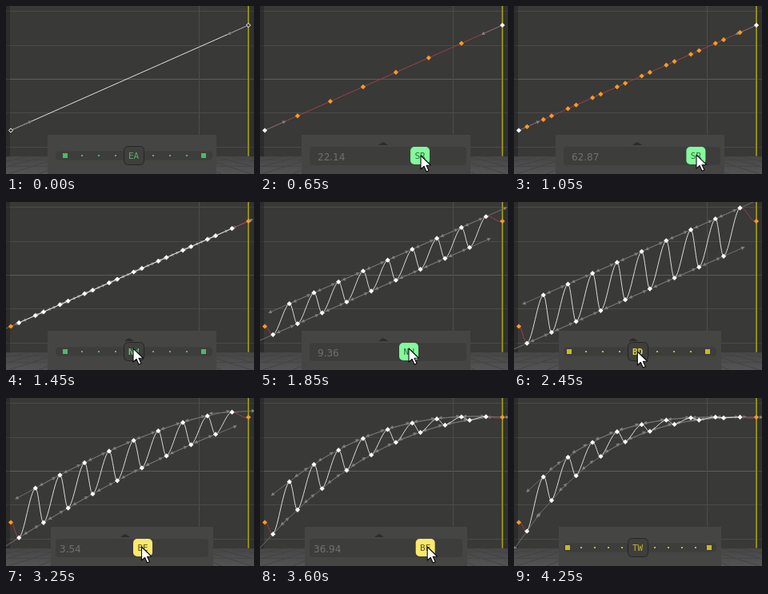
These frames come from a looping animation (310 px wide and 210 px high, 4.35 s). An HTML page with a canvas:

```html
<!DOCTYPE html>
<html lang="en">
<head>
<meta charset="utf-8">
<title>Curve tools</title>
<style>
html, body { margin: 0; width: 310px; height: 210px; overflow: hidden; background: #393937; }
canvas { display: block; width: 310px; height: 210px; }
</style>
</head>
<body>
<canvas id="stage"></canvas>
<script>
const W = 310, H = 210, LOOP = 4350, TICK = 50;
const X0 = 6, X1 = 303, Y0 = 155.5, Y1 = 24, FRAMES = 29;
const SLOPE = (Y1 - Y0) / (X1 - X0), REACH = 26.5, PULL = 0.68;
const canvas = document.getElementById('stage');
const c = canvas.getContext('2d');
const dpr = window.devicePixelRatio || 1;
canvas.width = W * dpr;
canvas.height = H * dpr;

const GREEN = { mid: '#4fb868', text: '#5aa86c', hover: '#6cc781', knob: '#83fa9b', ink: '#2d6b3d' };
const YELLOW = { mid: '#c9b91f', text: '#c4b52c', hover: '#e6d632', knob: '#fae96c', ink: '#5f5719' };

// Piecewise linear track of [time, value] points
function track(points, t) {
  if (t <= points[0][0]) return points[0][1];
  for (let i = 1; i < points.length; i++) {
    const [ta, a] = points[i - 1], [tb, b] = points[i];
    if (t < tb) return a + (b - a) * (t - ta) / (tb - ta);
  }
  return points[points.length - 1][1];
}

const SAMPLE = [[300, 0], [400, 12], [650, 40], [1000, 67.4]];
const WAVE = [[1550, 0], [1650, 9], [1850, 26], [2150, 45]];
const EASE = [[2850, 0], [3050, 5], [3250, 16], [3550, 46], [3850, 80]];
const MOUSE_X = [[50, 190], [200, 160], [300, 160], [400, 173], [650, 201], [1000, 228], [1150, 228],
  [1350, 159], [1550, 159], [1650, 168], [1850, 186], [2150, 204], [2250, 204], [2400, 154.5],
  [2850, 153], [3050, 158], [3250, 169.5], [3550, 202], [3850, 245]];
const MOUSE_Y = [[50, 189], [650, 187], [1150, 186], [1450, 183], [1850, 183], [2250, 184],
  [2450, 187], [3250, 186], [3850, 186]];

const percent = x => x * x / 72.26;

function line(x0, y0, x1, y1, color, width = 1) {
  c.strokeStyle = color;
  c.lineWidth = width;
  c.beginPath();
  c.moveTo(x0, y0);
  c.lineTo(x1, y1);
  c.stroke();
}

function rect(x, y, w, h, color) {
  c.fillStyle = color;
  c.fillRect(x, y, w, h);
}

function rounded(x, y, w, h, r, fill, stroke) {
  c.beginPath();
  c.roundRect(x, y, w, h, r);
  c.fillStyle = fill;
  c.fill();
  if (stroke) {
    c.strokeStyle = stroke;
    c.lineWidth = 1;
    c.stroke();
  }
}

function shape(points, fill) {
  c.fillStyle = fill;
  c.beginPath();
  points.forEach(([x, y]) => c.lineTo(x, y));
  c.closePath();
  c.fill();
}

function diamond(x, y, r, fill, stroke) {
  shape([[x, y - r], [x + r, y], [x, y + r], [x - r, y]], fill);
  if (stroke) {
    c.strokeStyle = stroke;
    c.lineWidth = 1;
    c.stroke();
  }
}

function text(s, x, y, font, color, align) {
  c.font = font;
  c.textAlign = align;
  c.textBaseline = 'alphabetic';
  c.fillStyle = color;
  c.fillText(s, x, y);
}

function drawLabel(s, x, color, weight = 'normal') {
  text(s, x, 191, weight + ' 11px "DejaVu Sans Mono", monospace', color, 'center');
}

function drawGraph() {
  rect(0, 0, W, H, '#393937');
  for (const y of [6.5, 49.5, 133.5, 176.5]) line(0, y, W, y, '#4b4b49');
  line(0, 91.5, W, 91.5, '#5d5d5b');
  line(241.5, 0, 241.5, 188, '#4d4d4b');
  rect(0, 0, 5, 188, 'rgba(30,30,32,.45)');
  rect(304, 0, 6, 188, 'rgba(30,30,32,.3)');
  rect(302, 0, 2, 188, '#918919');
}

function drawFloor() {
  const g = c.createLinearGradient(0, 188, 0, 210);
  g.addColorStop(0, '#474747');
  g.addColorStop(1, '#535353');
  c.fillStyle = g;
  c.fillRect(0, 188, W, 22);
  for (let i = -9; i <= 9; i++) {
    line(155 + i * 21, 188, 155 + i * 38, 210, '#434343');
  }
  line(0, 192.5, W, 192.5, '#454545');
  line(0, 200.5, W, 200.5, '#454545');
}

function bezier(a, b, color) {
  const k = PULL * Math.min(1, (b.x - a.x) / (a.hx + b.hx));
  c.strokeStyle = color;
  c.lineWidth = 0.9;
  c.beginPath();
  c.moveTo(a.x, a.y);
  c.bezierCurveTo(a.x + a.hx * k, a.y + a.hy * k, b.x - b.hx * k, b.y - b.hy * k, b.x, b.y);
  c.stroke();
}

// A key with its handle vector, after the wave and the ease are applied
function makeKey(frame, side, amp, pow) {
  const x = X0 + (X1 - X0) * frame / FRAMES;
  const y = Y0 + SLOPE * (x - X0) + side * amp;
  const u = (X1 - x) / (X1 - X0);
  let yy = y, m = SLOPE;
  if (side && pow) {
    const r = u ** pow;
    yy = Y1 + (y - Y1) * r;
    m = SLOPE * r - (y - Y1) * pow * u ** (pow - 1) / (X1 - X0);
  }
  const hx = REACH / Math.hypot(1, m);
  return { x, y: yy, hx, hy: hx * m };
}

function arrow(x, y, k, dir) {
  const a = Math.atan2(k.hy, k.hx) + (dir < 0 ? Math.PI : 0);
  c.save();
  c.translate(x, y);
  c.rotate(a);
  shape([[2.5, 0], [-2, -2.2], [-2, 2.2]], '#828282');
  c.restore();
}

function drawHandles(k, dirs) {
  for (const d of dirs) line(k.x, k.y, k.x + d * k.hx, k.y + d * k.hy, '#757575', 0.9);
  for (const d of dirs) arrow(k.x + d * k.hx, k.y + d * k.hy, k, d);
}

function drawCurve(t) {
  const count = Math.floor(FRAMES * percent(track(SAMPLE, t)) / 100);
  const amp = track(WAVE, t) * 0.57;
  const pow = 1.95 * (track(EASE, t) / 80) ** 1.05;
  const picked = t >= 1150;
  const keys = [makeKey(0, 0, 0, 0)];
  for (let i = 1; i <= count; i++) {
    keys.push(makeKey(Math.floor(FRAMES * i / (count + 1)), i % 2 ? 1 : -1, amp, pow));
  }
  keys.push(makeKey(FRAMES, 0, 0, 0));
  const last = keys.length - 1;
  const red = '#a8434b';

  if (picked) for (const k of keys.slice(1, last)) drawHandles(k, [-1, 1]);
  for (let i = 0; i < last; i++) {
    const edge = i === 0 || i === last - 1;
    bezier(keys[i], keys[i + 1], t < 300 ? '#f4f4f4' : picked && !edge ? '#ececec' : red);
  }
  if (!picked) {
    drawHandles(keys[0], [1]);
    drawHandles(keys[last], [-1]);
  }
  keys.forEach((k, i) => {
    const end = i === 0 || i === last;
    if (end && t < 300) diamond(k.x, k.y, 2.6, '#393937', '#fff');
    else diamond(k.x, k.y, 3.1, end !== picked ? '#fff' : '#ff9a22');
  });
}

function labelAt(t) {
  if (t < 200) return 'EA';
  if (t < 1350) return 'SR';
  if (t < 2350) return 'NW';
  if (t < 2650) return 'BD';
  return t < 4000 ? 'BE' : 'TW';
}

function drawPanel(t) {
  const green = t < 2350, tone = green ? GREEN : YELLOW;
  const left = green ? 52 : 56, right = green ? 263 : 259;
  const mid = green ? 160 : 155;
  const label = labelAt(t), mouse = t >= 50 && t < 4250;
  rect(left, 161, right - left, 49, '#454543');
  if (mouse) shape([[mid - 12, 174], [mid - 8, 171], [mid - 6, 170], [mid - 4, 171], [mid, 174]], '#2c2c2b');

  let offset = -1;
  if (t >= 300 && t < 1150) offset = track(SAMPLE, t);
  else if (t >= 1550 && t < 2250) offset = track(WAVE, t);
  else if (t >= 2850 && t < 4000) offset = track(EASE, t);

  const gx = 62, gw = green ? 196 : 191;
  if (offset >= 0) {
    rounded(gx, 176, gw, 23, 4, '#3d3d3c');
    text(percent(offset).toFixed(2), green ? 72 : 67, 193, '12px "DejaVu Sans", sans-serif', '#707070', 'left');
    const x = mid + offset;
    rounded(x - 12, 176, 24, 22, 5, tone.knob);
    drawLabel(label, x, tone.ink);
  } else {
    rounded(gx, 181.5, gw, 11, 4, '#3d3d3c');
    const four = label === 'TW';
    const far = four ? 88.5 : 86.5, step = four ? 17 : 21;
    const centre = mid + 0.5;
    for (const d of [-1, 1]) {
      rect(centre + d * far - 3, 184, 6, 6, tone.mid);
      for (let i = 1; i <= (four ? 4 : 3); i++) {
        rect(centre + d * (far - i * step) - 1, 186, 2, 2, tone.mid);
      }
    }
    rounded(mid - 12.5, 175.5, 25, 23, 5, '#3f3f3e', '#252525');
    const hover = mouse && t < 4000 && t >= 200;
    drawLabel(label, mid - 0.5, hover ? tone.hover : tone.text, hover ? 'bold' : 'normal');
  }
}

function drawMouse(t) {
  if (t < 50 || t >= 4250) return;
  c.save();
  c.translate(track(MOUSE_X, t), track(MOUSE_Y, t));
  shape([[0, 0], [0, 17], [4, 13.3], [7, 20], [10, 18.7], [7, 12.3], [12.3, 12]], '#fff');
  c.strokeStyle = '#0a0a0a';
  c.lineWidth = 1.1;
  c.lineJoin = 'round';
  c.stroke();
  c.restore();
}

function draw(t) {
  c.setTransform(dpr, 0, 0, dpr, 0, 0);
  drawGraph();
  drawCurve(t);
  drawFloor();
  drawPanel(t);
  drawMouse(t);
}

const start = performance.now();
function loop() {
  const t = (performance.now() - start) % LOOP;
  draw(Math.floor(t / TICK) * TICK);
  requestAnimationFrame(loop);
}
draw(0);
requestAnimationFrame(loop);
</script>
</body>
</html>
```
